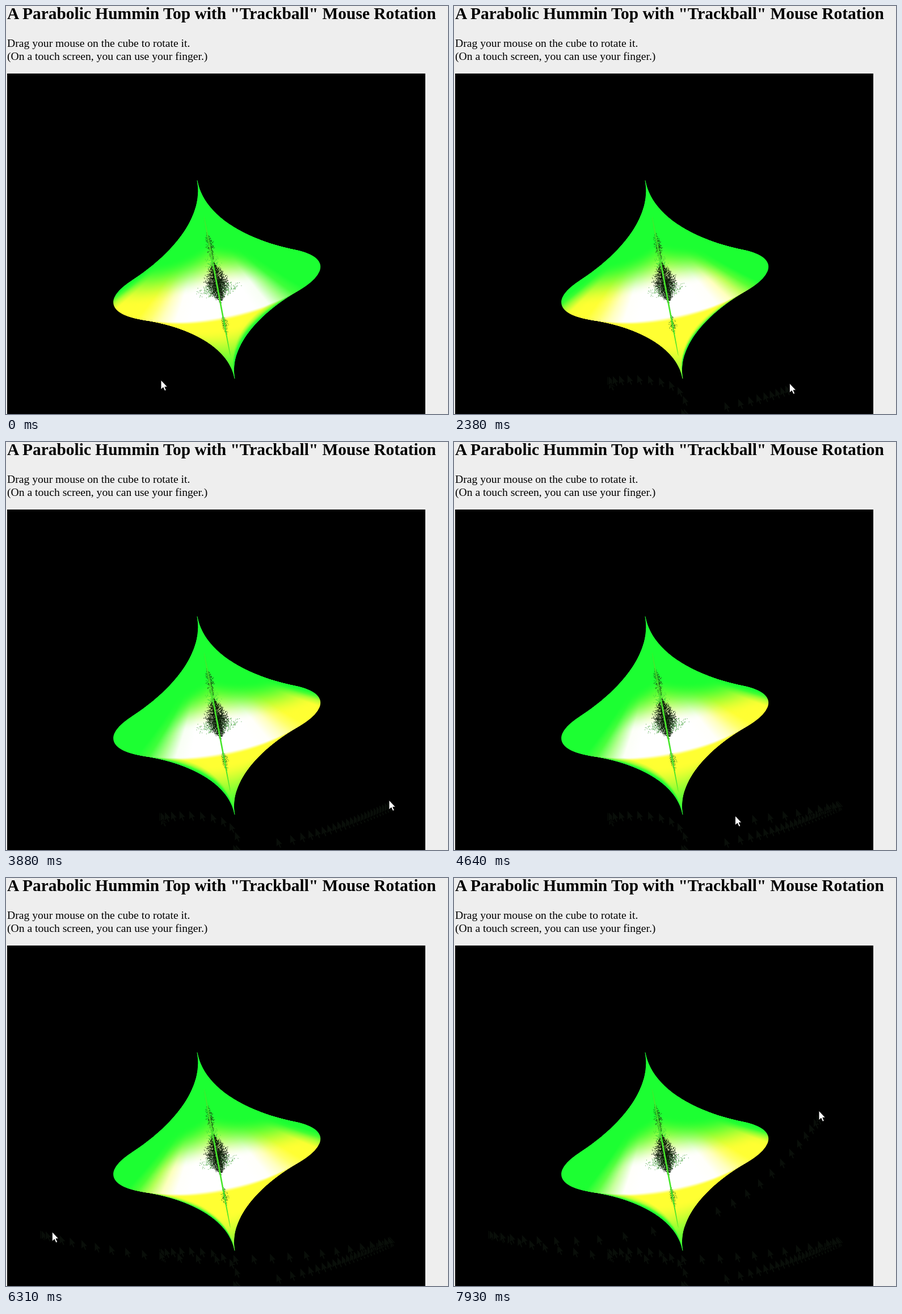
These frames come from a looping animation (779 by 719 pixels, 8 s). An HTML page with a canvas:

```html
<!DOCTYPE html>
<html lang="en">
<head>
<meta charset="utf-8">
<title>Parabolic top</title>
<style>
  html, body { margin: 0; width: 779px; height: 719px; overflow: hidden; background: #eee; }
  canvas { position: absolute; left: 0; top: 0; }
  p, h1 { position: absolute; left: 2px; margin: 0; color: #000; white-space: pre;
    font: 19.65px/23px "Liberation Serif", "Times New Roman", serif; }
  h1 { top: -4px; font-size: 29.44px; line-height: 34px; font-weight: bold; }
  p { top: 54px; }
</style>
</head>
<body>
<canvas id="stage" width="779" height="719"></canvas>
<h1>A Parabolic Hummin Top with "Trackball" Mouse Rotation</h1>
<p>Drag your mouse on the cube to rotate it.
(On a touch screen, you can use your finger.)</p>
<script>
const LOOP = 8000, TICK = 70;
const ctx = document.getElementById('stage').getContext('2d');

const clamp = x => Math.min(1, Math.max(0, x));
const mix = (a, b, k) => a + (b - a) * k;
const smooth = x => x * x * (3 - 2 * x);
const soft = (x, a, b) => smooth(clamp((x - a) / (b - a)));
const band = (x, a, b, w) => soft(x, a - w, a + w) * (1 - soft(x, b - w, b + w));

// Strokes of the pointer: a quadratic curve each. The light swings along,
// -1 is far left and 1 far right.
const STROKES = [
  { from: 650, to: 1490, path: [[270, 652], [440, 632], [396, 740]], light: [-1, -.9], ease: u => u * u },
  { from: 1690, to: 3420, path: [[400, 709], [538, 693], [676, 631]], light: [-.9, 1], ease: u => u ** .4 },
  { from: 3880, to: 5840, path: [[675, 631], [367, 700], [60, 620]], light: [1, .7], ease: smooth },
  { from: 6100, to: 7020, path: [[60, 620], [260, 655], [461, 578]], light: [.7, -.45], ease: u => u * u },
  { from: 7020, to: 7930, path: [[461, 578], [552, 535], [643, 410]], light: [-.45, .9], ease: u => 1 - (1 - u) ** 2 }
];
const REST = { tip: [273, 659], light: -1 };

function along([a, b, c], k) {
  return a.map((v, i) => mix(mix(v, b[i], k), mix(b[i], c[i], k), k));
}

// every pose of the loop, one per tick of each stroke
const POSES = [{ time: 0, ...REST }];
for (const { from, to, path, light, ease } of STROKES) {
  const n = Math.round((to - from) / TICK);
  for (let i = 0; i <= n; i++) {
    const u = i / n;
    POSES.push({ time: mix(from, to, u), tip: along(path, ease(u)), light: mix(...light, u * u) });
  }
}

// The top: discs stacked along a tilted axis, radius falling as a parabola.
const CENTER = [370, 482], TILT = -.187, HALF = 177, RADIUS = 185, FLAT = .3;

// phi: degrees from the front, positive to the right; s: 0 at the rim, 1 at a tip
function shade(phi, s, upper, light) {
  let yellow = band(phi, -38 - 28 * (1 - light), 38 + 28 * (1 + light), 14);
  let white = band(phi, -40, 40, 16);
  if (upper) {
    const limit = .45 - .2 * Math.abs(phi) / 90;
    yellow *= 1 - soft(s, limit - .25, limit + .05);
    white *= 1 - soft(s, .15, .42);
  } else {
    const limit = 1.3 - .6 * Math.abs(light);
    yellow *= 1 - soft(s, limit - .4, limit + .4);
    white *= 1 - soft(s, .01, .14);
  }
  return `rgb(${mix(28, 255, yellow)},255,${mix(50, 255, white * yellow)})`;
}

function drawDisc(s, upper, light) {
  const r = RADIUS * (1 - s) ** 2 + .5;
  const fill = ctx.createConicGradient(-Math.PI / 2, 0, 0);
  for (let q = 0; q <= 1; q += 1 / 40) fill.addColorStop(Math.min(q, 1), shade((.5 - q) * 360, s, upper, light));
  ctx.save();
  ctx.translate(0, (upper ? -HALF : HALF) * s + 9 * (1 - s));
  ctx.scale(1, FLAT + .8 / r);
  ctx.fillStyle = fill;
  ctx.beginPath();
  ctx.arc(0, 0, r, 0, 2 * Math.PI);
  ctx.fill();
  ctx.restore();
}

function randomizer(seed) {
  return () => {
    seed = (seed * 1664525 + 1013904223) >>> 0;
    return seed / 4294967296;
  };
}

// speckles along the axis, densest in the middle
function speckle(rnd, count, y, height, width, color) {
  ctx.fillStyle = color;
  for (let i = 0; i < count; i++) {
    const k = (rnd() + rnd()) / 2;
    const dx = (rnd() + rnd() + rnd() - 1.5) * width * Math.sin(Math.PI * k);
    ctx.fillRect(dx, y + (k - .5) * height, 1, 1);
  }
}

function drawNoise(light) {
  const rnd = randomizer(7), wide = .6 + .4 * Math.abs(light);
  speckle(rnd, 250, -30, 44, 12 * wide, '#3bdc3b');
  speckle(rnd, 650 * wide, 17, 36, 34 * wide, '#4aa544');
  speckle(rnd, 230, -60, 56, 6, '#1a4a16');
  speckle(rnd, 2300, 5, 76, 17, '#0c1a08');
  speckle(rnd, 130, 80, 38, 6, '#1f7a1f');
}

function drawTop(light) {
  ctx.save();
  ctx.translate(...CENTER);
  ctx.rotate(TILT);
  for (let i = HALF; i > 0; i--) drawDisc(i / HALF, false, light);
  for (let i = 0; i <= HALF; i++) drawDisc(i / HALF, true, light);
  drawNoise(light);
  ctx.fillStyle = '#48e62c';
  ctx.beginPath();
  ctx.ellipse(0, 12, 1.4, 125, 0, 0, 2 * Math.PI);
  ctx.fill();
  ctx.restore();
}

const ARROW = new Path2D('M0 0V17L4 13.3L6.7 19.3L9.4 18.1L6.8 12.3H11.6Z');

function drawArrow([x, y], color) {
  ctx.save();
  ctx.translate(x, y);
  ctx.fillStyle = color;
  ctx.fill(ARROW);
  ctx.stroke(ARROW);
  ctx.restore();
}

function draw(index) {
  const { tip, light } = POSES[index];
  ctx.clearRect(0, 0, 779, 719);
  ctx.save();
  ctx.beginPath();
  ctx.rect(2, 119, 737, 600);
  ctx.clip();
  ctx.fillStyle = '#000';
  ctx.fillRect(2, 119, 737, 600);
  // the pointer leaves a faint trail
  for (const pose of POSES.slice(0, index)) drawArrow(pose.tip, '#090e09');
  drawTop(light);
  drawArrow(tip, '#fff');
  ctx.restore();
}

const start = performance.now();
let shown = -1;
function tick() {
  const t = (performance.now() - start) % LOOP;
  const index = POSES.findLastIndex(pose => pose.time <= t + 3);
  if (index !== shown) draw(shown = index);
  requestAnimationFrame(tick);
}
tick();
</script>
</body>
</html>
```
